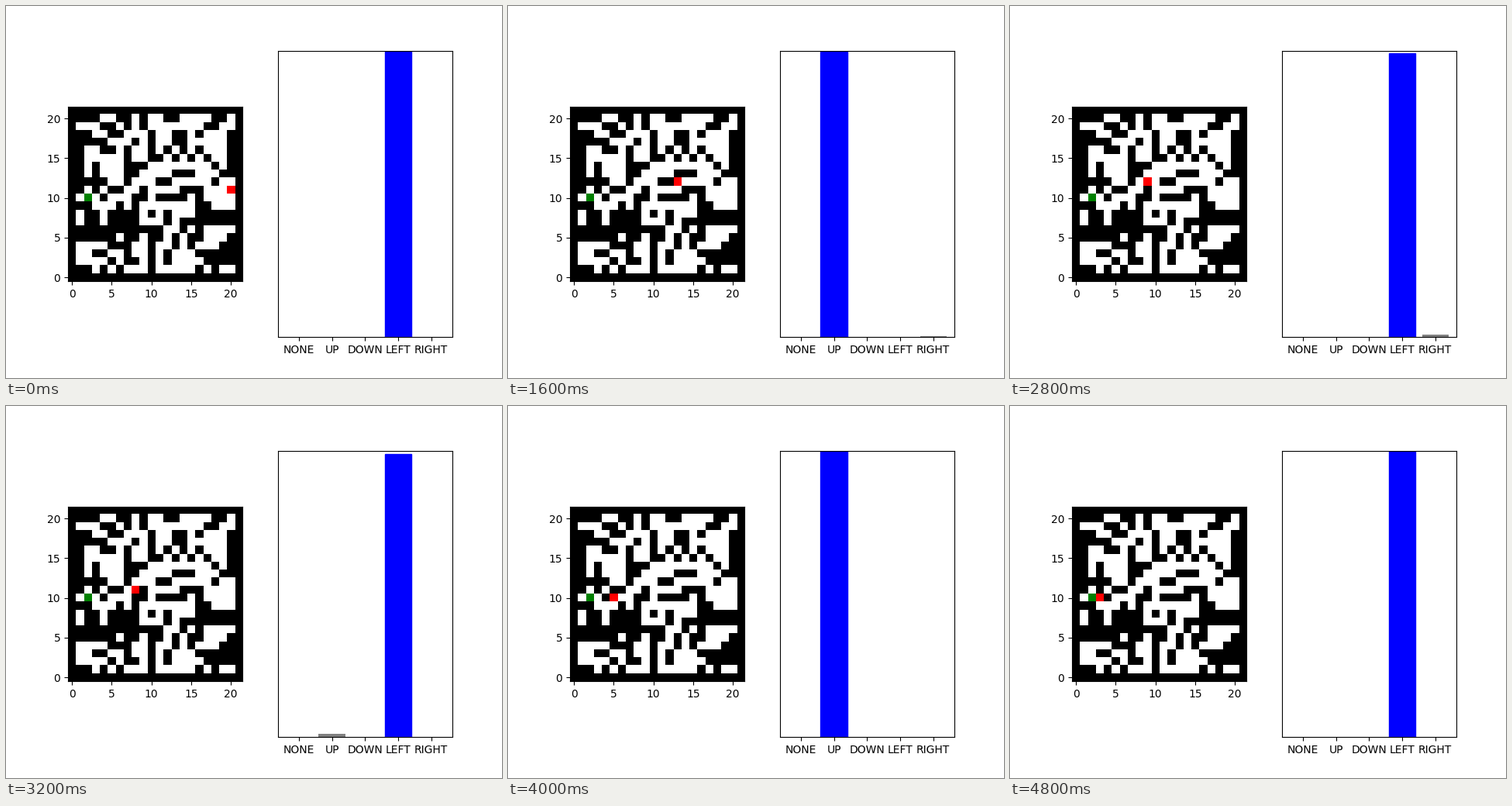
Write a matplotlib script that moves like this. It is 640 px wide and 480 px high and loops after 5 s.

```python
import matplotlib.pyplot as plt
import numpy as np
from matplotlib.animation import FuncAnimation

# Level map, top row first; '#' is wall.
MAZE = """
######################
####..##.#..##....##.#
#...##.#.#.......##..#
###..##...#..##.#...##
#####...#.#..##.....##
##..##.#..#.#.#.#...##
##.....#..##.#.#.#..##
##.#...###........#.##
##.#...##....###...###
#####..#...##.....#..#
##.#.##..#....###....#
#...#...##.####.#....#
###...#.#.......##...#
#.##.####.#.#...######
#.##.####...#.########
############..#.#....#
######.##.##.#.##...##
#....###..#..#.#...###
#..##..#..#.#...######
#....#.##.#.#....#####
###.#.#...#.....#.#..#
######################
""".split()

ACTIONS = ["NONE", "UP", "DOWN", "LEFT", "RIGHT"]
# Row indices grow upwards on screen, so DOWN raises y.
STEPS = {"L": (-1, 0), "U": (0, -1), "D": (0, 1)}
BAR = {"U": 1, "D": 2, "L": 3, "R": 4}
MOVES = "LLLDLLLLULLLDLLULULLULLDL"
START, GOAL = (20, 11), (2, 10)

# Steps where the policy is not fully certain: probability per action.
DOUBTS = {
    1: dict(L=.9946),
    2: dict(L=.9946),
    4: dict(L=.997, D=.003),
    5: dict(L=.997, R=.003),
    6: dict(L=.994, R=.005),
    7: dict(L=.9945, R=.004),
    8: dict(U=.996, R=.003),
    9: dict(L=.994, U=.005),
    10: dict(L=.998),
    11: dict(L=.9935, R=.006),
    12: dict(D=.934, L=.058, R=.008),
    13: dict(L=.925, D=.03, R=.045),
    14: dict(L=.991, R=.0085),
    15: dict(U=.988, L=.008, R=.004),
    16: dict(L=.988, U=.0115),
    18: dict(L=.988, U=.0115),
}

WHITE, BLACK = (255, 255, 255), (0, 0, 0)
RED, GREEN = (255, 0, 0), (0, 128, 0)

level = np.array([[BLACK if c == "#" else WHITE for c in row]
                  for row in reversed(MAZE)], dtype=np.uint8)
level[GOAL[1], GOAL[0]] = GREEN

path = [START]
for move in MOVES[:-1]:
    dx, dy = STEPS[move]
    path.append((path[-1][0] + dx, path[-1][1] + dy))
for x, y in path:
    level[y, x] = WHITE

fig, (maze_ax, policy_ax) = plt.subplots(1, 2, figsize=(6.4, 4.8), dpi=100)
image = maze_ax.imshow(level, origin="lower")
bars = policy_ax.bar(range(len(ACTIONS)), [1] * len(ACTIONS), color="gray")
policy_ax.set_ylim(0, 1)
policy_ax.set_xticks(range(len(ACTIONS)), ACTIONS)
policy_ax.set_yticks([])


def update(step):
    x, y = path[step]
    grid = level.copy()
    grid[y, x] = RED
    image.set_data(grid)

    move = MOVES[step]
    heights = {BAR[k]: p for k, p in DOUBTS.get(step, {move: 1}).items()}
    for i, bar in enumerate(bars):
        bar.set_height(heights.get(i, 0))
        chosen = i == BAR[move]
        bar.set_facecolor("blue" if chosen else "gray")
        bar.set_edgecolor("blue" if chosen else "none")
    return [image, *bars]


anim = FuncAnimation(fig, update, frames=len(MOVES), interval=200,
                     repeat=True, repeat_delay=0, blit=False)
plt.show()
```
